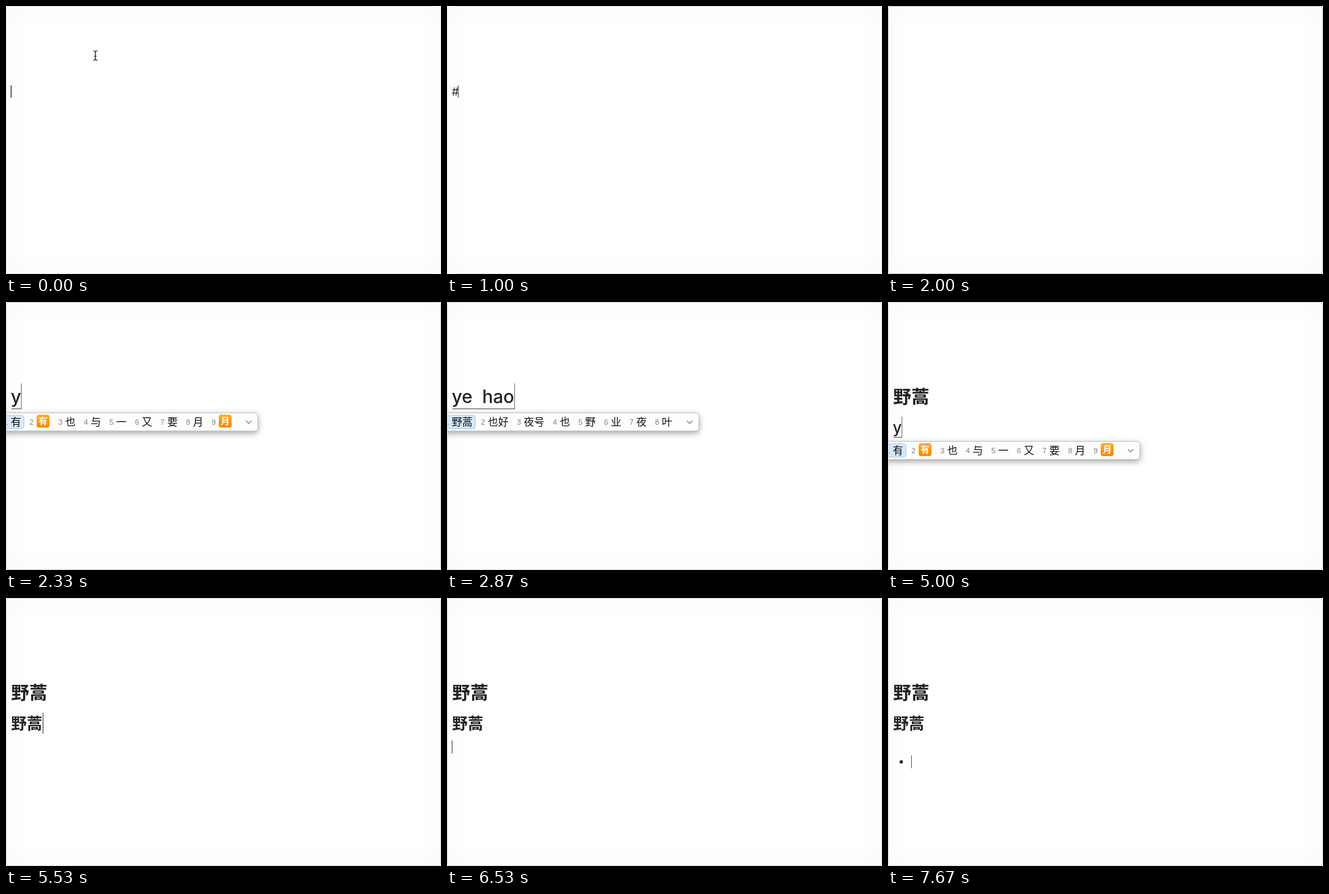
Write an HTML page that moves like this. It is 640 px wide and 395 px high and loops after 8000 ms.

```html
<!DOCTYPE html>
<html lang="zh-CN">
<head>
<meta charset="utf-8">
<title>Markdown typing</title>
<style>
html, body { margin: 0; width: 100%; height: 100%; overflow: hidden; background: #fff; }
#page {
  position: absolute; left: 0; top: 0; width: 640px; height: 395px; overflow: hidden;
  box-sizing: border-box; border: 1px solid; border-radius: 4px;
  background: #fff; box-shadow: inset 0 0 30px 10px rgba(0, 0, 0, .019);
}
svg { position: absolute; left: -1px; top: -1px; }
text { white-space: pre; }
.typed { word-spacing: 7px; }
.panel { filter: drop-shadow(0 3px 5px rgba(0, 0, 0, .36)); }
</style>
</head>
<body>
<div id="page"><svg id="stage" width="640" height="395"></svg></div>
<script>
const LOOP = 8000;
const CJK = "'Noto Sans CJK SC', 'Noto Sans CJK', sans-serif";
const LATIN = "Inter, sans-serif";
const INK = "#222226";
const NAME = "野蒿";

// Line styles: font size, baseline, caret top and bottom, candidate panel top
const H1 = { size: 26.7, base: 149, top: 120, end: 158, panel: 163.5 };
const H2 = { size: 23, base: 192.5, top: 169, end: 200, panel: 205.5 };

const page = document.getElementById("page");
const stage = document.getElementById("stage");
const pen = document.createElement("canvas").getContext("2d");

const text = (s, x, y, size, font, weight = 400, fill = INK) =>
  `<text x="${x}" y="${y}" font-size="${size}" font-family="${font}" font-weight="${weight}" fill="${fill}">${s}</text>`;

const rect = (x, y, w, h, fill, extra = "") =>
  `<rect x="${x}" y="${y}" width="${w}" height="${h}" fill="${fill}" ${extra}/>`;

const caret = (x, top, end, fill = "#444") => rect(x, top, 1, end - top, fill);
const lineCaret = (line, x) => caret(x, line.top, line.end, "#3a3d48");
const heading = line => text(NAME, 7.5, line.base, line.size, CJK, 700);
const marks = (s, y) => text(s, 7, y, 16, LATIN);

function mouse(x, y) {
  const d = `M${x - 3} ${y - 7}q3 0 3 2.5v9q0 2.5-3 2.5m6-14q-3 0-3 2.5v9q0 2.5 3 2.5m-5-6h4`;
  return `<path d="${d}" fill="none" stroke="#222" stroke-width="1.2"/>`;
}

// Candidates marked with * are drawn as orange emoji tiles
function panel(top, list) {
  const base = top + 18.7;
  let x = 7, out = "";
  list.split(" ").forEach((word, i) => {
    const tile = word[0] === "*";
    const width = tile ? 20 : 15.3 * word.length;
    if (!i) {
      out += rect(-10.5, top + 3.5, width + 21.5, 19.5, "#d8e8fc", 'rx="3.5" stroke="#a5caf3"');
    }
    out += text(i + 1, x - 10, base - 1.7, 11, "'Liberation Sans', sans-serif", 400, "#808080");
    if (tile) {
      out += rect(x + .5, top + 2.5, 19, 19, "url(#orange)", 'rx="3.5"');
      out += text(word[1], x + 3.5, top + 16.8, 13, CJK, 700, "#fff");
    } else {
      out += text(word, x, base, 15.3, CJK, 400, "#111");
    }
    x += width + 22.3;
  });
  const box = rect(-20, top, 390.5, 26.5, "#fdfdfd", 'rx="4.5" stroke="#bbb" stroke-width=".8"');
  const chevron = `<path d="M353 ${top + 11.5}l4 4 4-4" fill="none" stroke="#888" stroke-width="1.3"/>`;
  return `<g class="panel">${box}</g>${out}${chevron}`;
}

function ime(line, typed, list) {
  pen.font = `500 ${line.size}px ${LATIN}`;
  const gap = typed.includes(" ") ? 7 : 0;
  const width = Math.round(pen.measureText(typed).width + gap);
  return `<g class="typed">${text(typed, 7, line.base, line.size, LATIN, 500)}</g>`
    + rect(8, line.end - 1, width - 1, 1, "#555")
    + caret(7 + width, line.top, line.end, "#777")
    + panel(line.panel, list);
}

const CANDIDATES = [
  ["y", "有 *有 也 与 一 又 要 月 *月"],
  ["ye", "也 野 业 夜 叶 页 爷 液 冶"],
  ["ye h", "也好 野火 夜 也 野 业 叶 页"],
  ["ye ha", "野蛤 也 野 业 夜 叶 页 爷"],
  ["ye hao", NAME + " 也好 夜号 也 野 业 夜 叶"]
];

const typing = (line, times, before = "") =>
  times.map((t, i) => [t, () => before + ime(line, ...CANDIDATES[i])]);

const first = heading(H1);
const both = first + heading(H2);
const bullet = '<circle cx="19.5" cy="241.5" r="2.5" fill="#222"/>';

const scenes = [
  [0, t => caret(7, 117, 135, "#000") + pointer(t)],
  [530, t => pointer(t)],
  [1000, () => marks("#", 131.5) + caret(16, 117, 135)],
  [1530, () => lineCaret(H1, 7)],
  [2000, () => ""],
  ...typing(H1, [2200, 2400, 2530, 2670, 2800]),
  [2930, () => first + lineCaret(H1, 62)],
  [3470, () => first],
  [3530, () => first + caret(7, 165, 184)],
  [4000, () => first + marks("#", 180) + caret(17, 165, 184)],
  [4070, () => first + marks("##", 180) + caret(28, 165, 184)],
  [4400, () => first + lineCaret(H2, 7)],
  [4800, () => first],
  ...typing(H2, [5000, 5130, 5200, 5330, 5400], first),
  [5530, () => both + lineCaret(H2, 54)],
  [6000, () => both],
  [6530, () => both + caret(7, 210, 229)],
  [6800, () => both + caret(7, 232, 251)],
  [7000, () => both + marks("-", 247) + caret(15, 232, 251)],
  [7530, () => both + bullet + caret(34, 232, 251, "#666")]
];

// Piecewise linear value through [time, value] points
function track(t, points) {
  let i = 1;
  while (i < points.length - 1 && t > points[i][0]) i++;
  const [t0, a] = points[i - 1], [t1, b] = points[i];
  return a + (b - a) * Math.min(1, Math.max(0, (t - t0) / (t1 - t0)));
}

function pointer(t) {
  const x = track(t, [[69, 131.5], [130, 119.5], [270, 119.5], [530, 114.5]]);
  const y = track(t, [[69, 73], [130, 56.5], [270, 56.5], [530, 58.5]]);
  return mouse(x, y);
}

const DEFS = `<defs><linearGradient id="orange" x2="0" y2="1">
  <stop stop-color="#ffb02e"/><stop offset="1" stop-color="#f78400"/></linearGradient></defs>`;

let shown = "";
function draw(now) {
  const t = now % LOOP;
  const scene = scenes.filter(s => s[0] <= t).pop();
  const markup = DEFS + scene[1](t);
  if (markup !== shown) stage.innerHTML = shown = markup;
  const grey = Math.round(track(t, [[1000, 236], [1330, 198], [2200, 198], [2400, 214], [3530, 218]]));
  page.style.borderColor = `rgb(${grey},${grey},${grey})`;
}

const start = performance.now();
function tick() {
  draw(performance.now() - start);
  requestAnimationFrame(tick);
}
tick();
</script>
</body>
</html>
```
